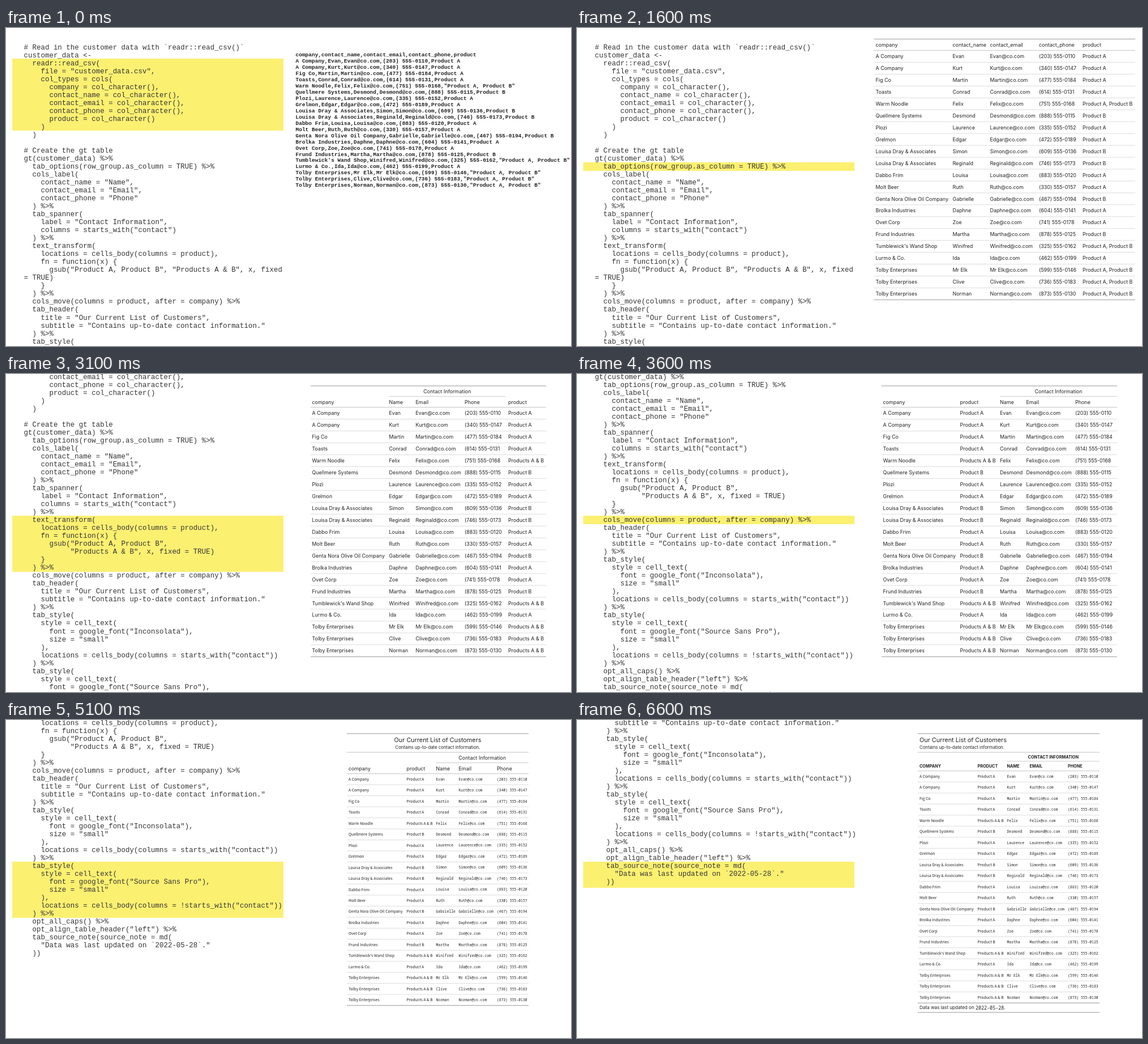
Recreate the animation shown at these times as an HTML page with a canvas. Size 998x561 px, loop 7100 ms.

```html
<!DOCTYPE html>
<html lang="en">
<head>
<meta charset="utf-8">
<title>Building a table step by step</title>
<style>
html, body { margin: 0; width: 100%; height: 100%; overflow: hidden; background: #fff; }
canvas { display: block; }
</style>
</head>
<body>
<canvas id="stage" width="998" height="561"></canvas>
<script type="text/plain" id="code"># Read in the customer data with `readr::read_csv()`
customer_data <-
  readr::read_csv(
    file = "customer_data.csv",
    col_types = cols(
      company = col_character(),
      contact_name = col_character(),
      contact_email = col_character(),
      contact_phone = col_character(),
      product = col_character()
    )
  )

# Create the gt table
gt(customer_data) %>%
  tab_options(row_group.as_column = TRUE) %>%
  cols_label(
    contact_name = "Name",
    contact_email = "Email",
    contact_phone = "Phone"
  ) %>%
  tab_spanner(
    label = "Contact Information",
    columns = starts_with("contact")
  ) %>%
  text_transform(
    locations = cells_body(columns = product),
    fn = function(x) {
      gsub("Product A, Product B",
           "Products A & B", x, fixed = TRUE)
    }
  ) %>%
  cols_move(columns = product, after = company) %>%
  tab_header(
    title = "Our Current List of Customers",
    subtitle = "Contains up-to-date contact information."
  ) %>%
  tab_style(
    style = cell_text(
      font = google_font("Inconsolata"),
      size = "small"
    ),
    locations = cells_body(columns = starts_with("contact"))
  ) %>%
  tab_style(
    style = cell_text(
      font = google_font("Source Sans Pro"),
      size = "small"
    ),
    locations = cells_body(columns = !starts_with("contact"))
  ) %>%
  opt_all_caps() %>%
  opt_align_table_header("left") %>%
  tab_source_note(source_note = md(
    "Data was last updated on `2022-05-28`."
  ))</script>
<script>
const ctx = document.getElementById("stage").getContext("2d");
const SANS = "Inter, sans-serif";
const COURIER = '"Liberation Mono", monospace';
const MONO = '"Noto Sans Mono", monospace';
const SOURCE = '"Noto Sans CJK JP", "Noto Sans", sans-serif';
const LINE = 14.01;

const code = document.getElementById("code").textContent.split("\n");
const wrapped = code.slice();
wrapped.splice(28, 2, '      gsub("Product A, Product B", "Products A & B", x, fixed', "= TRUE)");

// c company, n name, e email, t telephone, p product
const rows = `A Company,Evan,A
A Company,Kurt,A
Fig Co,Martin,A
Toasts,Conrad,A
Warm Noodle,Felix,AB
Quellmere Systems,Desmond,B
Plozi,Laurence,A
Grelmon,Edgar,A
Louisa Dray & Associates,Simon,B
Louisa Dray & Associates,Reginald,B
Dabbo Frim,Louisa,A
Molt Beer,Ruth,A
Genta Nora Olive Oil Company,Gabrielle,B
Brolka Industries,Daphne,A
Ovet Corp,Zoe,A
Frund Industries,Martha,B
Tumblewick's Wand Shop,Winifred,AB
Lurmo & Co.,Ida,A
Tolby Enterprises,Mr Elk,AB
Tolby Enterprises,Clive,AB
Tolby Enterprises,Norman,AB`.split("\n").map((line, i) => {
  const [c, n, kind] = line.split(",");
  return {
    c, n, e: n + "@co.com",
    t: `(${203 + i * 137 % 690}) 555-01${10 + i * 37 % 90}`,
    p: kind === "AB" ? "Product A, Product B" : "Product " + kind
  };
});
const rawHead = { c: "company", n: "contact_name", e: "contact_email", t: "contact_phone", p: "product" };
const niceHead = { ...rawHead, n: "Name", e: "Email", t: "Phone" };

// Text centred vertically on y; returns its width
function text(s, x, y, size, { font = SANS, weight = 400, color = "#222", align = "left" } = {}) {
  ctx.font = `${weight} ${size}px ${font}`;
  ctx.fillStyle = color;
  ctx.textAlign = align;
  ctx.fillText(s, x, y + size * .35);
  return ctx.measureText(s).width;
}

function box(x, y, w, h, color) {
  ctx.fillStyle = color;
  ctx.fillRect(x, y, w, h);
}
const hline = (x0, x1, y, color = "#d3d3d3", w = 1) => box(x0, y - w / 2, x1 - x0, w, color);
const vline = (x, y0, y1, color) => box(x - .5, y0, 1, y1 - y0, color);

function frame(x, y, w, h, r, fill, stroke = "#d5d9de") {
  ctx.beginPath();
  ctx.roundRect(x, y, w, h, r);
  ctx.fillStyle = fill;
  ctx.fill();
  ctx.lineWidth = 1;
  ctx.strokeStyle = stroke;
  ctx.stroke();
}

function drawCode(lines, shift, x, from, count, extra = 0) {
  const y = n => shift + (n - 1) * LINE;
  box(11, Math.round(y(from) - 7.4), 479, Math.round(count * LINE + 1 + extra), "#fcf071");
  lines.forEach((line, i) => {
    if (y(i + 1) < 566) text(line, x, y(i + 1), 12.48, { font: COURIER, color: "#333" });
  });
}

function drawCsv() {
  const lines = rows.map(r =>
    [r.c, r.n, r.e, r.t, r.p.includes(",") ? `"${r.p}"` : r.p].join());
  [Object.values(rawHead).join(), ...lines].forEach((s, i) =>
    text(s, 511.5, 47 + i * 10.95, 9.51, { font: COURIER, weight: 700 }));
}

function icon(d, x, y, fill) {
  ctx.save();
  ctx.translate(x, y);
  const path = new Path2D(d);
  ctx.lineWidth = 1;
  ctx.strokeStyle = ctx.fillStyle = "#57606a";
  fill ? ctx.fill(path) : ctx.stroke(path);
  ctx.restore();
}

function drawRepo() {
  const line = "#d8dee4", dark = "#24292f", gray = "#57606a", blue = "#2563d0";
  frame(504.5, -20, 470, 26.5, 3, "#fff", line);
  frame(504.5, 17, 470, 443, 3, "#fff", line);
  box(505, 17.5, 469, 25, "#f6f8fa");
  hline(505, 974, 42.5, line);
  text("22 lines (22 sloc)", 514, 30, 7.05, { font: MONO, color: dark });
  vline(597.5, 25, 35, line);
  text("1.35 KB", 604, 30, 7.05, { font: MONO, color: dark });

  frame(828.5, 21.5, 62, 17, 3, "#f6f8fa");
  vline(856.5, 22, 38, line);
  text("Raw", 834, 30, 7, { weight: 500, color: dark });
  text("Blame", 863, 30, 7, { weight: 500, color: dark });
  frame(896.5, 21.5, 37, 17, 3, "#f6f8fa");
  vline(918.5, 22, 38, line);
  icon("M-3.5 3.5l.7-2.5 4.5-4.5 1.8 1.8-4.5 4.5z", 907, 30);
  icon("M-2.2-1h4.4L0 1.4z", 926, 30, true);
  icon("M-1.5-4.5h6v6h-6zM-1.5-1.5h-3v6h6v-3", 944, 29.5);
  icon("M-3.5-2.5h7M-1.2-2.5v-1.5h2.4v1.5M-2.7-2.5l.5 6.5h4.4l.5-6.5", 962.5, 29.5);
  icon("M2.5-.5a3 3 0 1 0-6 0a3 3 0 1 0 6 0M1.7 1.7l2.5 2.5", 516, 51.5);
  text("Search this file...", 523, 52, 7, { color: gray });

  const xs = [537, 665, 732, 814, 887], step = 18.14;
  box(534, 61, 440, step, "#f8f9fb");
  [rawHead, ...rows].forEach((r, i) => {
    const y = 70 + i * step;
    hline(i ? 534 : 505, 974, 60.7 + i * step, line);
    text(i + 1, 529.5, y, 6.8, { font: MONO, color: gray, align: "right" });
    [..."cnetp"].forEach((k, j) =>
      text(r[k], xs[j], y, 7, { weight: i ? 400 : 600, color: dark }));
  });
  [534, 662, 729, 810.5, 884].forEach(x => vline(x, 61, 460, line));

  hline(514, 966, 485, "#e3e7eb");
  const links = { Terms: 564, Privacy: 594, Security: 627.5, Status: 664, Docs: 695,
    "Contact Quorby": 721.5, Pricing: 782, API: 814, Training: 835, Blog: 870.5, About: 895 };
  for (const s in links) text(s, links[s], 514, 7, { color: blue });
  ctx.beginPath();
  ctx.arc(704, 535, 7, 0, 7);
  ctx.fillStyle = gray;
  ctx.fill();
  text("© 2022 Quorby, Inc.", 716, 536, 7, { color: gray });
}

const base = { top: 21, order: "cnetp", head: niceHead, rowH: 20.95 };
const wide = { ...base, x0: 534, x1: 977, cols: [537, 673, 720, 807, 884] };
const merged = { ...base, x0: 538, x1: 954, cols: [540.5, 676.5, 723.5, 810, 887], spanner: true, merge: true };
const moved = { ...merged, order: "cpnet", cols: [540.5, 676.5, 747, 793.5, 880] };
const titled = { ...moved, title: true };
const monoed = { ...titled, x0: 579, x1: 951, cols: [582, 718, 788, 828, 895], mono: true };
const styled = { ...monoed, top: 24, x0: 602, x1: 923, cols: [605, 707.5, 759.5, 799.5, 867], source: true, rowH: 19.47 };
const caps = { ...styled, caps: true, rowH: 19.5 };
const left = { ...caps, left: true };

function drawTable(o) {
  const { x0, x1, cols, order } = o;
  const edge = y => hline(x0, x1, y, "#b4b4b4", 1.4);
  let y = o.top;
  edge(y);
  if (o.title) {
    const x = o.left ? cols[0] : (x0 + x1) / 2, align = o.left ? "left" : "center";
    text("Our Current List of Customers", x, y + 10.8, 10.85, { align });
    text("Contains up-to-date contact information.", x, y + 24.3, 7.75, { align });
    y += 33;
    hline(x0, x1, y, "#ccc", 1.2);
  }
  const label = (s, x, y, align) => o.caps
    ? text(s.toUpperCase(), x, y, 7.25, { weight: 700, align })
    : text(s, x, y, 8.95, { align });
  if (o.spanner) {
    const i = order.indexOf("n"), a = cols[i], b = i === 1 ? cols[4] - 5 : x1;
    label("Contact Information", (a + b) / 2, y + (o.caps ? 8.3 : 10), "center");
    y += o.caps ? 15.8 : 18.5;
    hline(a, b, y, "#ccc");
  }
  const headH = o.caps ? 17 : o.spanner ? 19.2 : 20;
  [...order].forEach((k, j) => label(o.head[k], cols[j], y + (o.caps ? 8.2 : 10)));
  y += headH;
  hline(x0, x1, y, "#ccc", 1.2);

  rows.forEach((r, i) => {
    const mid = y + (i + .5) * o.rowH;
    if (i) hline(x0, x1, y + i * o.rowH, "#dcdcdc");
    [...order].forEach((k, j) => {
      const s = o.merge && k === "p" ? r.p.replace("Product A, Product B", "Products A & B") : r[k];
      const contact = "net".includes(k);
      if (o.mono && contact) text(s, cols[j], mid, 6.38, { font: MONO });
      else if (o.source) text(s, cols[j], mid, 6.8, { font: SOURCE });
      else text(s, cols[j], mid, 8.95);
    });
  });
  y += rows.length * o.rowH;
  edge(y);
  if (o.note) {
    let x = cols[0];
    x += text("Data was last updated on ", x, y + 8.3, 8.1);
    x += text("2022-05-28", x, y + 8.3, 8.4, { font: MONO, weight: 500 });
    text(".", x, y + 8.3, 8.1);
    edge(y + 16.5);
  }
}

// Puts a code line at the reading height and marks the lines after it
const scrolled = (line, count, x = 31.5, extra = 0) =>
  drawCode(code, 257 - (line - 1) * LINE, x, line, count, extra);
const still = (line, count) => drawCode(wrapped, 33.8, 31.5, line, count);

const raw = { ...wide, top: 19.5, x0: 524.5, x1: 986, cols: [527.5, 663.5, 729.5, 816, 893], head: rawHead };
const steps = [
  [0, () => { still(3, 9); drawCsv(); }],
  [1000, () => { still(3, 9); drawRepo(); }],
  [1100, () => { still(15, 1); drawTable(raw); }],
  [1600, () => { still(16, 1); drawTable(raw); }],
  [2100, () => { still(17, 5); drawTable(wide); }],
  [2600, () => { scrolled(22, 4); drawTable({ ...wide, spanner: true }); }],
  [3100, () => { scrolled(26, 7); drawTable(merged); }],
  [3600, () => { scrolled(33, 1); drawTable(moved); }],
  [4100, () => { scrolled(34, 4); drawTable(titled); }],
  [4600, () => { scrolled(38, 7); drawTable(monoed); }],
  [5100, () => { scrolled(45, 7); drawTable(styled); }],
  [5600, () => { scrolled(52, 1); drawTable(caps); }],
  [6100, () => { scrolled(53, 1); drawTable(left); }],
  [6600, () => { scrolled(54, 3, 36.5, 3); drawTable({ ...left, note: true }); }]
];

const start = performance.now();
function tick() {
  const t = (performance.now() - start) % 7100;
  box(0, 0, 998, 561, "#fff");
  steps.findLast(s => s[0] <= t)[1]();
  requestAnimationFrame(tick);
}
tick();
</script>
</body>
</html>
```
